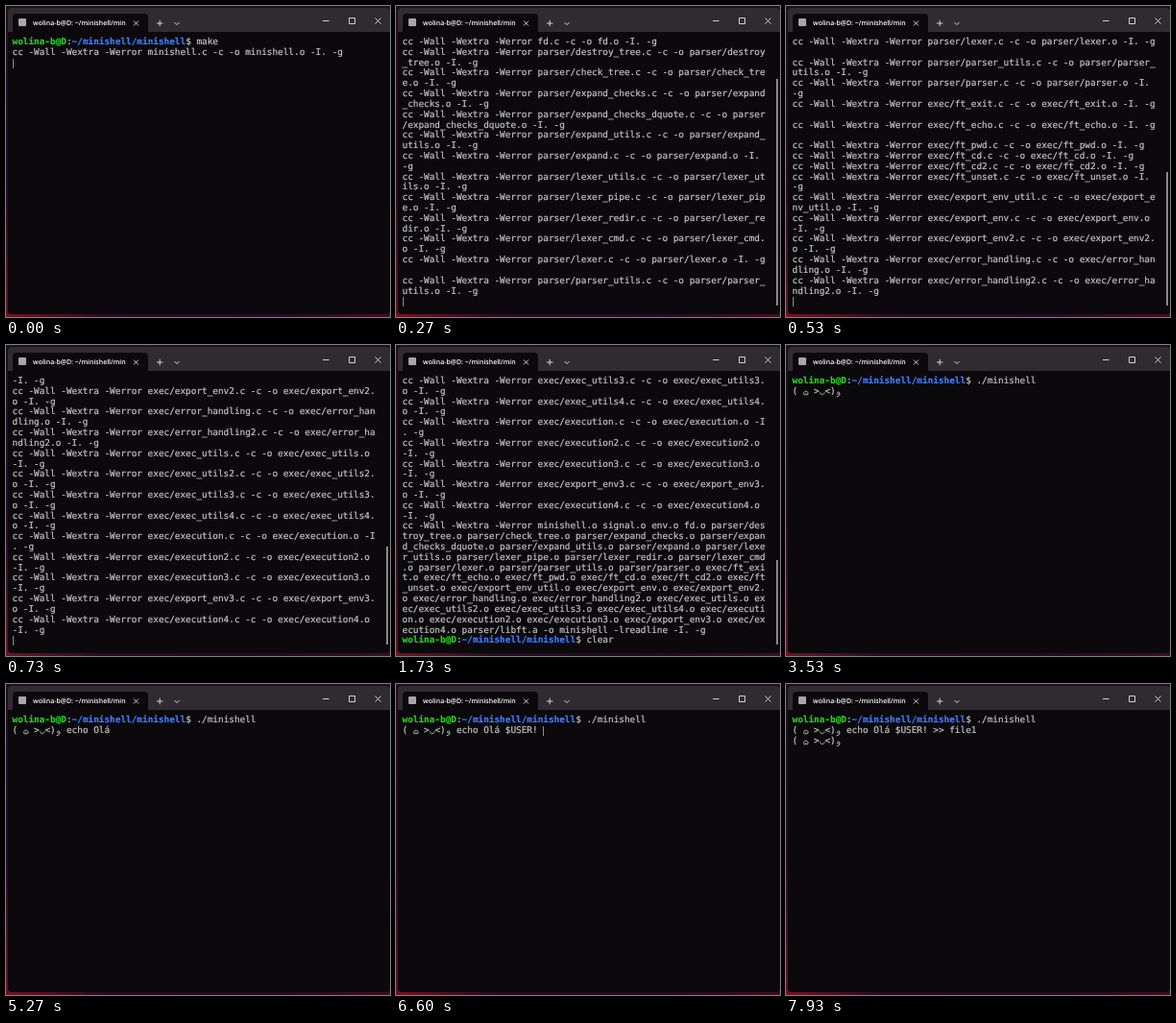
Recreate the animation shown at these times as an HTML page. Size 400 px wide and 324 px high, loop 8 s.

```html
<!DOCTYPE html>
<html lang="en">
<head>
<meta charset="utf-8">
<title>Terminal</title>
<style>
  html, body { margin: 0; width: 100%; height: 100%; overflow: hidden; }
  body {
    position: relative;
    background:
      linear-gradient(90deg, #74121f, #2a0a22 25%, #240a22 70%, #420c1e) 0 320px / 100% 4px no-repeat,
      linear-gradient(#1f0d1d, #260b20 60%, #6a1020);
  }
  .window {
    position: absolute; left: 2px; top: 2px; width: 398px; height: 319px;
    background: #0b090c; border-radius: 4px; overflow: hidden;
  }
  .bar { height: 25px; background: #2f2b31; }
  .tab {
    position: absolute; left: 5px; top: 6px; width: 141px; height: 19px;
    background: #0b090c; border-radius: 4px 4px 0 0;
  }
  .icon {
    position: absolute; left: 6px; top: 5px; width: 8px; height: 8px;
    background: #a8a6aa; border-radius: 1px;
  }
  .title {
    position: absolute; left: 21px; top: 5px; width: 98px; overflow: hidden;
    font: 600 6.95px/11px "Open Sans", "Noto Sans", sans-serif;
    color: #fff; white-space: pre; text-rendering: geometricPrecision;
  }
  .controls { position: absolute; left: 0; top: 0; fill: none; stroke: #e4e2e5; }
  pre {
    position: absolute; left: 6.5px; top: 33px; margin: 0; color: #c4c4c4;
    font: 9.38px/10.82px "DejaVu Sans Mono", "Liberation Mono", monospace;
    -webkit-text-stroke: .2px; text-rendering: geometricPrecision;
    font-variant-ligatures: none;
  }
  pre b { color: #2bcb20; }
  pre b + b { color: #3f7bfa; }
  pre svg {
    width: 1ch; height: 10.8px; vertical-align: top; overflow: visible;
    fill: none; stroke: #c4c4c4; stroke-width: .9;
  }
  pre i {
    display: inline-block; width: 1px; height: 10px; margin-right: -1px;
    background: #8c8c8c; vertical-align: top;
  }
  #thumb { position: absolute; left: 396px; width: 1.5px; background: #8a8a8a; }
</style>
</head>
<body>
<div class="window">
  <div class="bar"></div>
  <div class="tab">
    <div class="icon"></div>
    <div class="title">wolina-b@D: ~/minishell/min</div>
  </div>
</div>
<svg class="controls" width="400" height="30">
  <path stroke-width=".9" d="M133 15.5l5 5m0-5l-5 5M157 18h6.4m-3.2-3.2v6.4M175.5 17l2.5 2.5 2.5-2.5"/>
  <path stroke-width=".9" d="M330 15.5h6.5M357.5 12.5h6v6h-6zM384.5 12.5l6 6m0-6l-6 6"/>
</svg>
<pre id="screen"></pre>
<div id="thumb"></div>

<script>
const LOOP = 8000, STEP = 1000 / 15, COLS = 67, ROWS = 26;
const TRACK = 272, TRACK_END = 312;
const CC = 'cc -Wall -Wextra -Werror ';
const inDir = (dir, names) => names.split(' ').map(name => dir + name);
const units = [
  ...inDir('', 'minishell signal env fd'),
  ...inDir('parser/', 'destroy_tree check_tree expand_checks expand_checks_dquote expand_utils expand ' +
    'lexer_utils lexer_pipe lexer_redir lexer_cmd lexer parser_utils parser'),
  ...inDir('exec/', 'ft_exit ft_echo ft_pwd ft_cd ft_cd2 ft_unset export_env_util export_env export_env2 ' +
    'error_handling error_handling2 exec_utils exec_utils2 exec_utils3 exec_utils4 ' +
    'execution execution2 execution3 export_env3 execution4')
];
const compile = u => `${CC}${u}.c -c -o ${u}.o -I. -g`;
const link = `${CC}${units.map(u => u + '.o').join(' ')} parser/libft.a -o minishell -lreadline -I. -g`;

const glyph = d => `<svg viewBox="0 0 5.63 10.8"><path d="${d}"/></svg>`;
const bash = '<b>wolina-b@D</b>:<b>~/minishell/minishell</b>$ ';
const face = '( ' +
  glyph('M2.8 6.6C2.6 8.4.6 8.4.6 6.6S1.7 4.2 2.8 4.2 5 4.8 5 6.6 3 8.4 2.8 6.6') +
  ' >' + glyph('M.5 5.4C.8 8.4 4.8 8.4 5.1 5.4') + '&lt;)' +
  glyph('M3.7 6.8a1.2 1.2 0 1 1 0-1.2c.8 2.4-.4 4.2-3 4') + ' ';

// Text typed so far: each chunk appears at its own time.
const typed = (chunks, times, t) => chunks.filter((_, i) => t >= times[i]).join('');

// Commands finish quickly at first, then three per step.
const compiled = step => step <= 4 ? Math.round(step * 3.75) : Math.min(36, 15 + 3 * (step - 4));

// A line that fills the width exactly leaves an empty row after it.
function wrap(line) {
  const rows = [];
  for (let i = 0; i <= line.length; i += COLS) rows.push(line.slice(i, i + COLS));
  return rows;
}

function build(step, t) {
  const rows = [bash + 'make'];
  for (const u of units.slice(0, compiled(step) + 1)) rows.push(...wrap(compile(u)));
  if (step >= 12) rows.push(...wrap(link));
  rows.push(step >= 14 ? bash + typed([...'clear'], [1130, 1200, 1330, 1400, 1470], t) : '');
  return rows;
}

function shell(t) {
  const rows = [bash + typed(['.', '/', 'm', 'i', 'n', 'ishell '], [2130, 2200, 2400, 2530, 2670, 2800], t)];
  if (t >= 3000) rows.push(t < 3130 ? '' : face + typed([...'echo Olá $USER! >> file1'], [
    3730, 3800, 3930, 4000, 4070, 4270, 4330, 4930, 5000,
    5670, 5800, 5870, 6000, 6070, 6270, 6470, 6670, 6800,
    7200, 7330, 7470, 7530, 7600, 7800], t));
  if (t >= 7930) rows.push(face);
  return rows;
}

const cursorOff = [[1730, 1800], [3530, 3730], [5270, 5530], [7930, LOOP]];
const screenEl = document.getElementById('screen');
const thumb = document.getElementById('thumb');
let shown = -1;

function draw(step) {
  const t = Math.round(step * STEP / 10) * 10;
  const rows = t < 1800 ? build(step, t) : shell(t);
  const hidden = cursorOff.some(([from, to]) => t >= from && t < to);
  screenEl.innerHTML = rows.slice(-ROWS).join('\n') + (hidden ? '' : '<i></i>');

  const height = TRACK * ROWS / rows.length;
  thumb.hidden = rows.length <= ROWS;
  thumb.style.height = height + 'px';
  thumb.style.top = TRACK_END - height + 'px';
}

function tick(now) {
  const step = Math.floor((now % LOOP + 4) / STEP) % 120;
  if (step !== shown) draw(shown = step);
  requestAnimationFrame(tick);
}
draw(0);
requestAnimationFrame(tick);
</script>
</body>
</html>
```
